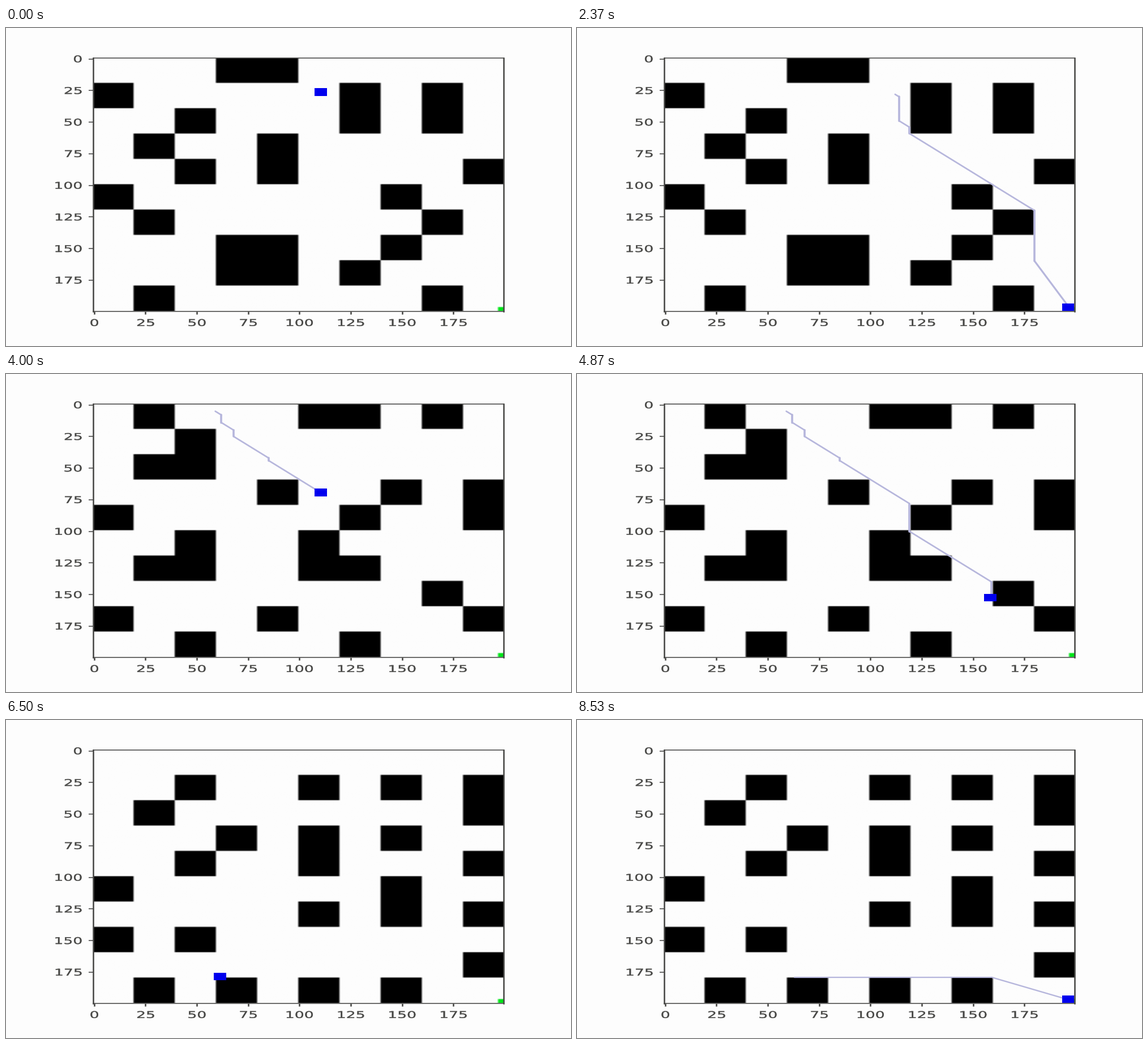
A matplotlib script that plays this animation: 998 px wide and 561 px high, repeating every 8610 ms.

```python
import numpy as np
import matplotlib.pyplot as plt
from matplotlib.animation import FuncAnimation
from matplotlib.collections import LineCollection
from matplotlib.patches import PathPatch, Rectangle
from matplotlib.textpath import TextPath
from matplotlib.transforms import Affine2D

W, H, DPI = 998, 561, 100
PT = 72 / DPI                      # points per pixel
LOOP, STEP = 8610, 30
N, CELL, ROBOT = 200, 20, 6
LEFT, RIGHT, TOP, BOTTOM = 153.8, 879.2, 53.4, 499.6
SX, SY = (RIGHT - LEFT) / N, (BOTTOM - TOP) / N
STRETCH = SX / SY                  # the whole plot is wider than tall
SPEED = 0.0953                     # grid units per ms
GOAL = (197, 197)
PAPER = np.array([253, 253, 253]) / 255
INK, TRAIL, BLUE, GREEN = "#464644", "#b6b6dc", "#0000ee", (0, 0.9, 0.1)

plt.rcParams["font.family"] = "DejaVu Sans"


def build_map(rows):
    """Paint the walls; each word lists the walled columns of one row."""
    grid = np.tile(PAPER, (N, N, 1))
    cells = grid.reshape(N // CELL, CELL, N // CELL, CELL, 3)
    for r, cols in enumerate(rows.split(",")):
        for c in cols:
            cells[r, :, int(c)] = 0
    grid[-3:, -3:] = GREEN
    return grid


def build_route(start, *corners):
    """Go diagonally, then straight, to each corner; end directly at the goal."""
    route = [np.array(start)]
    for corner in corners:
        gap = corner - route[-1]
        route += [route[-1] + gap.min(), np.array(corner)]
    return np.array(route + [np.array(GOAL)], float)


class Run:
    def __init__(self, shown, moves, rows, *points):
        self.shown, self.moves = shown, moves
        self.grid = build_map(rows)
        self.route = build_route(*points)
        hops = np.abs(np.diff(self.route, axis=0)).max(axis=1)
        self.dist = np.append(0, np.cumsum(hops))

    def at(self, d):
        return np.array([np.interp(d, self.dist, axis) for axis in self.route.T])

    def state(self, t):
        """Robot position and the trail behind it, one unit after the start."""
        d = np.clip((t - self.moves) * SPEED, 0, self.dist[-1])
        pos = np.round(self.at(d))
        passed = self.route[(self.dist > 1) & (self.dist < d)]
        trail = np.vstack([self.at(1), passed, pos]) if d > 1 else pos[None]
        return pos, trail


RUNS = [
    Run(0, 0, "34,068,268,14,249,07,18,347,346,18",
        (111, 27), (114, 49), (119, 59), (180, 160)),
    Run(2800, 3297, "1568,2,12,479,069,25,1256,8,049,26",
        (58, 4), (62, 14), (68, 25), (85, 44), (119, 100), (159, 160)),
    Run(6300, 6800, ",2579,19,357,259,07,579,02,9,1357",
        (62, 179), (159, 179)),
]

fig = plt.figure(figsize=(W / DPI, H / DPI), dpi=DPI, facecolor=PAPER)
ax = fig.add_axes([LEFT / W, 1 - BOTTOM / H,
                   (RIGHT - LEFT) / W, (BOTTOM - TOP) / H])
image = ax.imshow(RUNS[0].grid, interpolation="bilinear", aspect="auto",
                  extent=(-0.9, N - 0.6, N - 0.6, -0.9))
line = ax.add_collection(LineCollection([], colors=TRAIL, capstyle="round",
                                        zorder=2), autolim=False)
robot = ax.add_patch(Rectangle((0, 0), ROBOT, ROBOT, color=BLUE, lw=0, zorder=2.2))
ax.set(xlim=(-0.5, N - 0.5), ylim=(N - 0.5, -0.5), facecolor=PAPER)

ticks = range(0, N, 25)
ax.set_xticks(ticks)
ax.set_yticks(ticks)
ax.tick_params(labelbottom=False, labelleft=False, color=INK)
ax.tick_params(axis="x", length=3.5 * SY * PT / 1.5, width=SX * PT * 0.7)
ax.tick_params(axis="y", length=3.5 * SX * PT / 1.5, width=SY * PT * 0.7)
for side, spine in ax.spines.items():
    upright = side in ("left", "right")
    spine.set(color=INK, linewidth=(SX if upright else SY) * PT * 0.7)


def label(text, x, y, align):
    """Tick label in pixels from the top left, widened like the plot."""
    path = TextPath((0, 0), text, size=16.4)
    box = path.get_extents()
    anchor = box.x1 if align == "right" else (box.x0 + box.x1) / 2
    place = (Affine2D().translate(-anchor, -(box.y0 + box.y1) / 2)
             .scale(STRETCH, 1).translate(x, H - y))
    fig.add_artist(PathPatch(path, transform=place, color=INK, lw=0.4 * PT))


for v in ticks:
    label(str(v), LEFT + (v + 0.5) * SX + 0.5, 519.7, "center")
    label(str(v), 133.5, TOP + (v + 0.5) * SY, "right")


def pen_widths(points):
    """Stroke widths of a pen as wide and as tall as one grid unit."""
    dx, dy = (np.diff(points, axis=0) * (SX, SY)).T
    return np.hypot(SX * dy, SY * dx) / np.maximum(np.hypot(dx, dy), 1e-6) * PT


def draw(i):
    t = i * STEP
    run = [r for r in RUNS if r.shown <= t][-1]
    pos, trail = run.state(t)
    image.set_data(run.grid)
    robot.set_xy(pos - ROBOT / 2 - 0.7)
    line.set_segments(np.stack([trail[:-1], trail[1:]], axis=1))
    if len(trail) > 1:
        line.set_linewidths(pen_widths(trail))
    return image, line, robot


anim = FuncAnimation(fig, draw, frames=LOOP // STEP, interval=STEP,
                     repeat=True, repeat_delay=0, blit=False)
plt.show()
```
